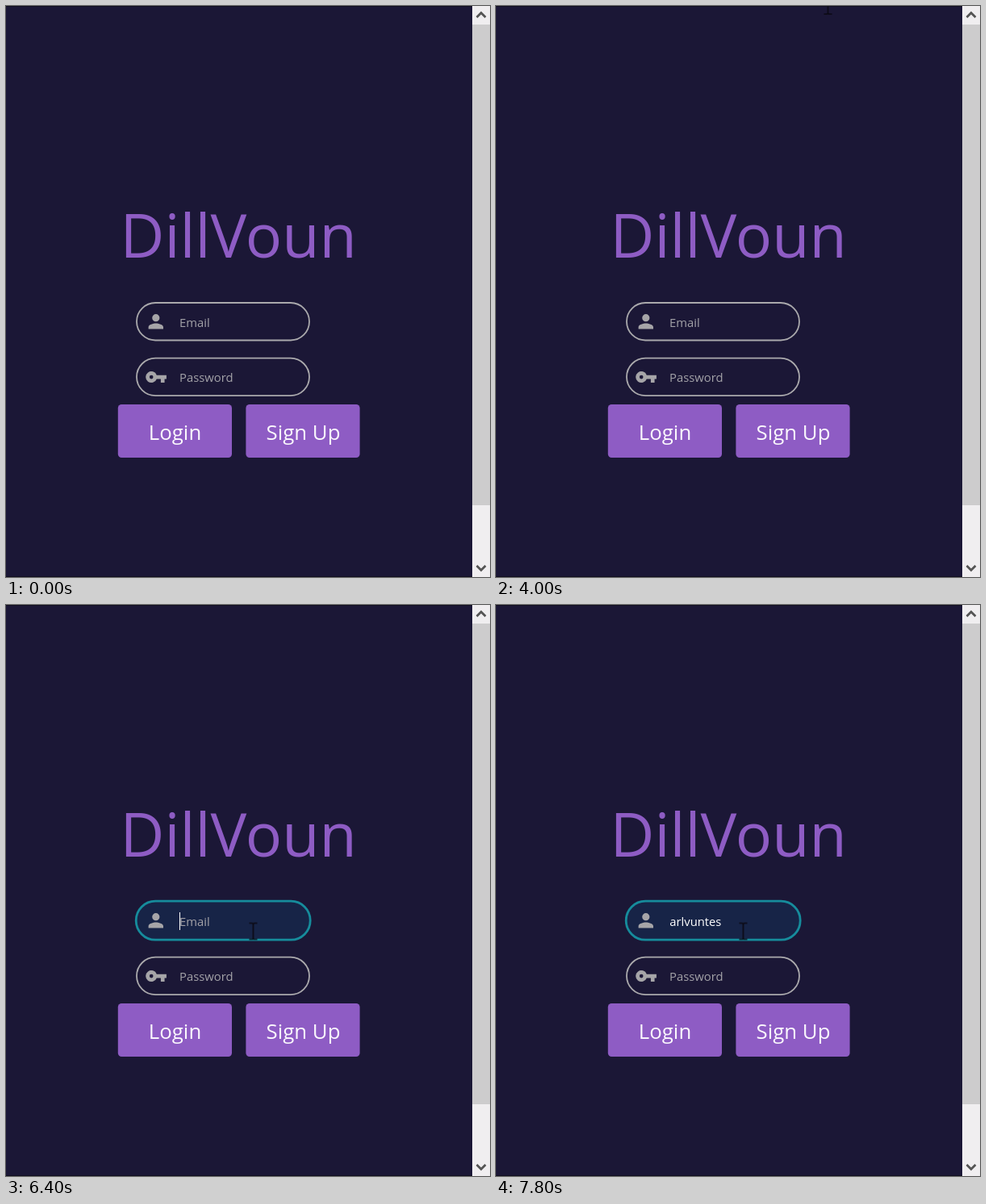
An HTML page that plays this animation: 600 by 708 pixels, repeating every 8000 ms.

```html
<!DOCTYPE html>
<html lang="en">
<head>
<meta charset="utf-8">
<title>Login form</title>
<style>
  html, body { margin: 0; width: 100%; height: 100%; overflow: hidden; background: #1b1736; }
  body { position: relative; font-family: "Open Sans", "Noto Sans", sans-serif; }
  svg { position: absolute; left: 0; top: 0; display: block; }
  .title { font-size: 75.3px; fill: #8e5cc4; }
  .button rect { fill: #8e5cc4; }
  .button text { font-size: 25.8px; font-weight: 500; fill: #fbf8fd; text-anchor: middle; }
  .hint { font-size: 14.8px; fill: #a3a2a8; }
  .icon { fill: #a6a5a8; }
  .field { fill: none; stroke: #aaa9ac; stroke-width: 1.8; }
  .focus { fill: #172447; stroke: #168c9c; stroke-width: 2.8; }
  .chevron { fill: none; stroke: #555; stroke-width: 2.8; }

  .focus, .email, .arrow, .beam, .caret, .typed span {
    animation: 8s step-end infinite;
  }
  .focus { animation-name: focus; }
  .email { animation-name: email; }
  .arrow { animation-name: arrow; }
  .beam  { animation-name: beam; }
  .caret { animation-name: caret; }

  .typed {
    position: absolute; left: 215.2px; top: 380px;
    font-size: 14.8px; font-weight: 500; line-height: 24px; color: #fff; white-space: nowrap;
  }
  .typed span:nth-child(1) { animation-name: key1; }
  .typed span:nth-child(2) { animation-name: key2; }
  .typed span:nth-child(3) { animation-name: key3; }
  .typed span:nth-child(4) { animation-name: key4; }
  .typed span:nth-child(5) { animation-name: key5; }
  .typed span:nth-child(6) { animation-name: key6; }
  .caret { position: absolute; top: 1px; width: 1.7px; height: 22px; margin-left: -0.4px; background: #fff; }

  @keyframes focus {
    0% { visibility: hidden; }
    67.5%, 100% { visibility: visible; }
  }
  @keyframes email {
    0% { visibility: visible; }
    82.5%, 100% { visibility: hidden; }
  }
  @keyframes caret {
    0% { visibility: hidden; }
    67.5% { visibility: visible; }
    75% { visibility: hidden; }
    80% { visibility: visible; }
    97.5%, 100% { visibility: hidden; }
  }
  @keyframes arrow {
    0% { visibility: hidden; transform: translate(38px, 126px); }
    17.5% { visibility: visible; transform: translate(38px, 126px); }
    20% { visibility: visible; transform: translate(163px, 190px); }
    22.5% { visibility: visible; transform: translate(289px, 255px); }
    25% { visibility: visible; transform: translate(305px, 284px); }
    27.5% { visibility: visible; transform: translate(303px, 274px); }
    45%, 100% { visibility: hidden; transform: translate(303px, 274px); }
  }
  @keyframes beam {
    0% { visibility: hidden; transform: translate(411.5px, 0); }
    50% { visibility: visible; transform: translate(411.5px, 0); }
    52.5% { visibility: visible; transform: translate(395px, 55px); }
    55% { visibility: visible; transform: translate(376px, 125px); }
    57.5% { visibility: visible; transform: translate(355px, 200px); }
    60% { visibility: visible; transform: translate(336px, 262px); }
    62.5% { visibility: visible; transform: translate(322px, 301px); }
    65% { visibility: visible; transform: translate(310px, 385px); }
    67.5%, 100% { visibility: visible; transform: translate(306.5px, 404.5px); }
  }
  @keyframes key1 { 0% { font-size: 0; } 82.5%, 100% { font-size: 1em; } }
  @keyframes key2 { 0% { font-size: 0; } 87.5%, 100% { font-size: 1em; } }
  @keyframes key3 { 0% { font-size: 0; } 90%, 100% { font-size: 1em; } }
  @keyframes key4 { 0% { font-size: 0; } 92.5%, 100% { font-size: 1em; } }
  @keyframes key5 { 0% { font-size: 0; } 95%, 100% { font-size: 1em; } }
  @keyframes key6 { 0% { font-size: 0; } 97.5%, 100% { font-size: 1em; } }
</style>
</head>
<body>
<svg width="600" height="708" viewBox="0 0 600 708">
  <rect width="600" height="708" fill="#1b1736"/>
  <path d="M0 .5H578M0 707.5H578" stroke="#100d20"/>

  <!-- scrollbar -->
  <rect x="578" width="22" height="708" fill="#f0eef0"/>
  <rect x="578" y="23" width="22" height="596" fill="#cdcccd"/>
  <path class="chevron" d="M583.5 14L589 8.5L594.5 14M583.5 694L589 699.5L594.5 694"/>

  <text class="title" x="141.5" y="312">DillVoun</text>

  <rect class="field" x="162" y="368" width="214" height="46.5" rx="23.2"/>
  <rect class="focus" x="161.2" y="367.2" width="216" height="48" rx="24"/>
  <path class="icon" transform="translate(172 377.5) scale(1.15)"
    d="M12 12a4 4 0 1 0 0-8 4 4 0 0 0 0 8zm0 2c-2.7 0-8 1.3-8 4v2h16v-2c0-2.7-5.3-4-8-4z"/>
  <text class="hint email" x="215" y="398">Email</text>

  <rect class="field" x="162" y="436.7" width="214" height="46.5" rx="23.2"/>
  <path class="icon" fill-rule="evenodd" transform="translate(172 446) scale(1.17)"
    d="M12.65 10a6 6 0 1 0 0 4H17v4h4v-4h2v-4zM7 14a2 2 0 1 1 0-4 2 2 0 0 1 0 4z"/>
  <text class="hint" x="215" y="466">Password</text>

  <g class="button">
    <rect x="138.8" y="494" width="141.2" height="66" rx="4.5"/>
    <text x="209.5" y="538">Login</text>
  </g>
  <g class="button">
    <rect x="297.4" y="494" width="141.2" height="66" rx="4.5"/>
    <text x="368.5" y="538">Sign Up</text>
  </g>
</svg>

<div class="typed"><span>a</span><span>r</span><span>l</span><span>v</span><span>un</span><span>tes</span><i class="caret"></i></div>

<svg width="600" height="708" viewBox="0 0 600 708">
  <path class="arrow" fill="#fff" stroke="#0c0a14" stroke-width="1.2"
    d="M.5 .5V21L5 16.8L8.6 24.6L12 23L8.6 15.6H15.6Z"/>
  <path class="beam" fill="none" stroke="#0c0a14" stroke-width="1.7"
    d="M-5-10H-2Q0-10 0-8.5Q0-10 2-10H5M0-9V9M-5 10H-2Q0 10 0 8.5Q0 10 2 10H5"/>
</svg>
</body>
</html>
```
